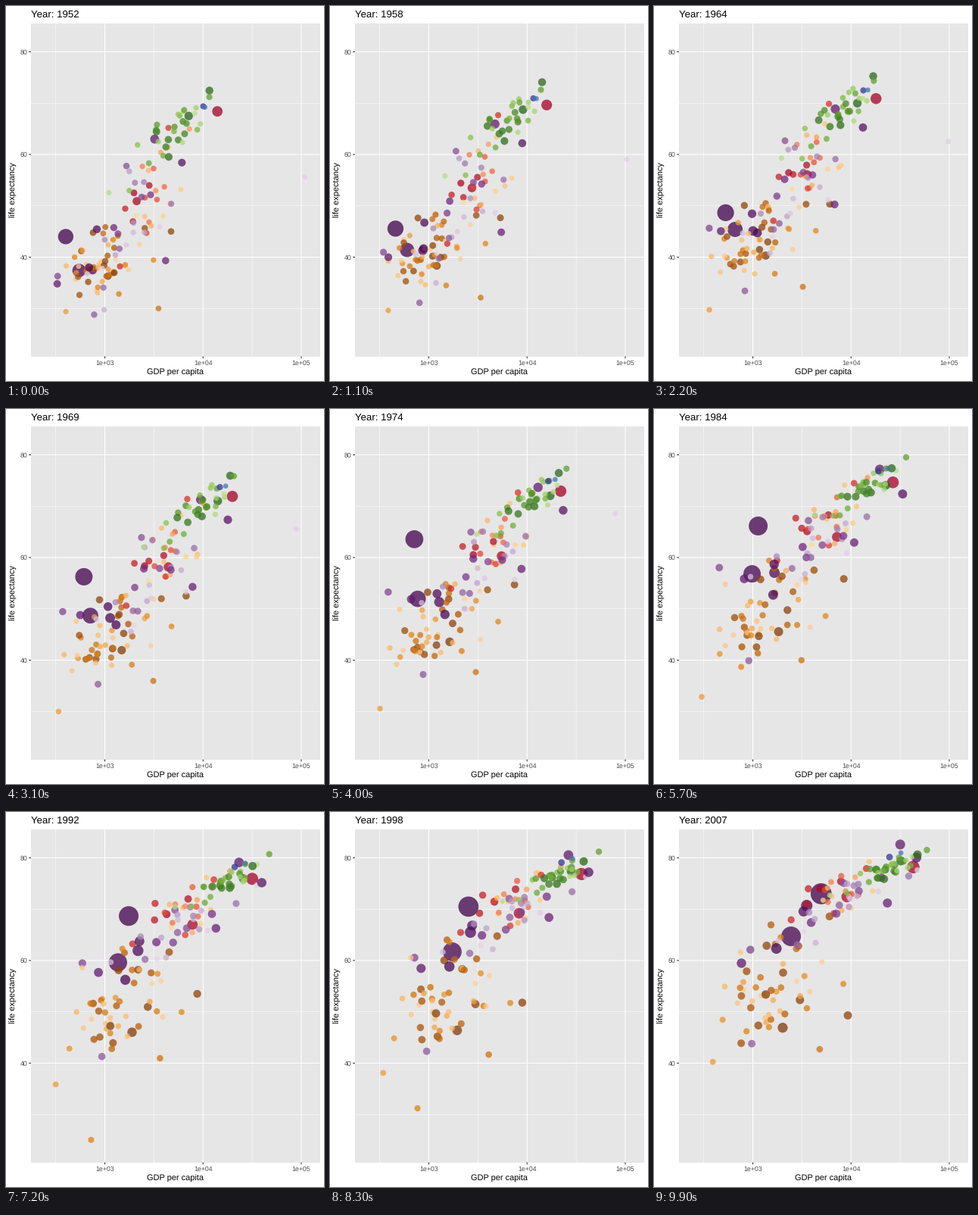
Animation, 420 px wide and 495 px high, one loop 10000 ms. Source, as a matplotlib script:

```python
import numpy as np
import matplotlib.pyplot as plt
from matplotlib.animation import FuncAnimation
from matplotlib.colors import LinearSegmentedColormap
from matplotlib.patches import Rectangle

W, H, DPI = 420, 495, 100
FRAMES = 100
PT = 72 / DPI
LEFT, RIGHT, TOP, BOTTOM = 33, 414.5, 23, 462.5

plt.rcParams.update({"font.family": "Liberation Sans", "text.hinting": "none"})
rng = np.random.default_rng(52)

t = np.linspace(0, 1, FRAMES)
years = 1952 + 55 * t
ease = (t + np.sin(np.pi / 2 * t)) / 2

# Shades from the most to the least populous country
SHADES = {
    "africa": ["#7F3B08", "#B35806", "#E08214", "#FDB863", "#FED09A"],
    "americas": ["#A50026", "#D73027", "#F46D43", "#FDAE61", "#FEDC8C"],
    "asia": ["#40004B", "#762A83", "#9970AB", "#C2A5CF", "#E7D4E8"],
    "europe": ["#276419", "#4D9221", "#7FBC41", "#B8E186"],
    "oceania": ["#313695", "#4575B4"],
}
RAMPS = {k: LinearSegmentedColormap.from_list(k, v) for k, v in SHADES.items()}

# region: top population in millions, share of it at the start
PEOPLE = {"africa": (80, .27), "americas": (60, .37), "asia": (200, .33),
          "europe": (75, .72), "oceania": (20, .42)}

dots = []


def px(log_gdp):
    return 130.5 + 129.75 * (log_gdp - 3)


def py(life):
    return 60.5 + 6.775 * (80 - life)


def radius(millions):
    return 3.2 + 10.67 * np.sqrt(millions / 1318)


def people(region, rank):
    top, share = PEOPLE[region]
    end = top * np.exp(-4.1 * rank)
    return share * end, end


def add(region, rank, log_gdp, life, pop=None):
    start, end = pop or people(region, rank)
    dots.append((px(log_gdp), py(life), radius(start + (end - start) * t),
                 RAMPS[region](rank)))


def track(region, rank, *path, pop=None):
    """A dot led through evenly timed (GDP, life expectancy) points."""
    gdp, life = np.transpose(path)
    stops = np.linspace(0, 1, len(path))
    add(region, rank, np.interp(t, stops, np.log10(gdp)), np.interp(t, stops, life), pop)


def crowd(region, count, skew, start, end):
    """Dots strewn along a wealth-health slope that eases from start to end.

    Both ends give mean log GDP, its spread, mean life, slope and life noise.
    """
    mean, spread, level, slope, noise = (a + (b - a) * ease for a, b in zip(start, end))
    u = (np.arange(count) + .5) / count
    z = .48 * np.log(u / (1 - u))
    z += skew * (z ** 2 - 1)
    ranks = rng.permutation(np.linspace(.04, 1, count))
    for zi, rank in zip(z, ranks):
        phase = rng.uniform(0, 2 * np.pi, 2)
        wealth = zi + .2 * np.sin(5 * t + phase[0])
        luck = np.clip(.85 * rng.standard_normal(), -1.6, 1.6)
        health = luck + .4 * np.sin(5 * t + phase[1])
        add(region, rank, np.maximum(mean + spread * wealth, 2.45),
            level + slope * wealth + noise * health)


# The largest countries
track("asia", 0, (400, 44), (510, 46.8), (705, 63.5), (1212, 66.5), (2160, 69.9),
      (4959, 73), pop=(556, 1318))
track("asia", .03, (547, 37.4), (835, 55.4), (2452, 64.7), pop=(372, 1110))
track("asia", .06, (750, 37.5), (1450, 54.6), (3541, 70.7), pop=(82, 224))
track("asia", .16, (3217, 63), (18000, 76.2), (31656, 82.6), pop=(86, 127))
track("americas", 0, (13990, 68.4), (24500, 74), (42952, 78.2), pop=(158, 301))
track("americas", .04, (2109, 50.9), (6900, 62.5), (9066, 72.4), pop=(57, 190))
track("africa", 0, (1077, 36.3), (1800, 45.3), (2014, 46.9), pop=(33, 135))
track("europe", 0, (7144, 67.5), (21200, 73.1), (32170, 79.4), pop=(69, 82))

# Those far from the crowd
track("asia", .97, (108382, 55.6), (100000, 61.8), (81000, 68.5), (31000, 72.4),
      (38000, 76), (47307, 77.6))
track("africa", .5, (493, 40), (515, 44), (780, 45.5), (720, 23), (863, 46.2))
track("africa", .4, (3521, 30), (2900, 39.5), (4797, 42.7))
track("africa", .08, (4725, 45), (8300, 57), (9270, 49.3))
track("asia", .42, (779, 28.8), (900, 39.2), (975, 43.8))
track("asia", .34, (331, 36.3), (400, 57.3), (944, 62.1))

crowd("africa", 48, .12, (2.99, .25, 38.8, 2.3, 3.8), (3.22, .39, 55.5, 5, 6))
crowd("americas", 23, 0, (3.48, .2, 53, 6, 5), (3.87, .27, 73.5, 2.2, 2.2))
crowd("asia", 26, 0, (3.2, .33, 46.5, 4.5, 7), (3.85, .48, 71, 5, 3))
crowd("europe", 29, -.12, (3.68, .26, 64, 4.8, 2.4), (4.36, .24, 77.6, 2.2, .9))
crowd("oceania", 2, 0, (4.01, .018, 69.3, -.2, 0), (4.47, .113, 80.7, .8, 0))

xs, ys, radii, colors = zip(*dots)
xs, ys, radii = (np.transpose(a) for a in (xs, ys, radii))

fig = plt.figure(figsize=(W / DPI, H / DPI), dpi=DPI, facecolor="white")
ax = fig.add_axes([0, 0, 1, 1])
ax.set(xlim=(0, W), ylim=(H, 0))
ax.axis("off")

panel = Rectangle((LEFT, TOP), RIGHT - LEFT, BOTTOM - TOP, fc="#E6E6E6", lw=0, zorder=0)
ax.add_patch(panel)


def line(x, y, width=1.07, color="white"):
    ax.plot(x, y, color=color, lw=width * PT, solid_capstyle="butt", zorder=1, snap=False)


def text(x, y, s, size, color="black", **kw):
    return ax.text(x, y, s, fontsize=size * PT, color=color, **kw)


for e in (2.5, 3.5, 4.5):
    line([px(e)] * 2, [TOP, BOTTOM], .53)
for v in (30, 50, 70):
    line([LEFT, RIGHT], [py(v)] * 2, .53)
for e in (3, 4, 5):
    line([px(e)] * 2, [TOP, BOTTOM])
    line([px(e)] * 2, [BOTTOM, BOTTOM + 2.75], color="#333333")
    text(px(e), 474, f"1e+0{e}", 8.8, "#4D4D4D", ha="center")
for v in (40, 60, 80):
    line([LEFT, RIGHT], [py(v)] * 2)
    line([LEFT - 2.75, LEFT], [py(v)] * 2, color="#333333")
    text(28.3, py(v) + 3.2, str(v), 8.8, "#4D4D4D", ha="right")

text((LEFT + RIGHT) / 2, 487, "GDP per capita", 11, ha="center")
text(13, (TOP + BOTTOM) / 2, "life expectancy", 11, rotation=90,
     ha="center", va="baseline", rotation_mode="anchor")
title = text(LEFT, 15, "", 13.2)

cloud = ax.scatter(xs[0], ys[0], c=colors, alpha=.75, linewidths=0, zorder=2)
cloud.set_clip_path(panel)


def draw(i):
    cloud.set_offsets(np.column_stack([xs[i], ys[i]]))
    cloud.set_sizes((2 * radii[i] * PT) ** 2)
    title.set_text(f"Year: {round(years[i])}")
    return cloud, title


anim = FuncAnimation(fig, draw, frames=FRAMES, interval=100, repeat=True, repeat_delay=0)
plt.show()
```
